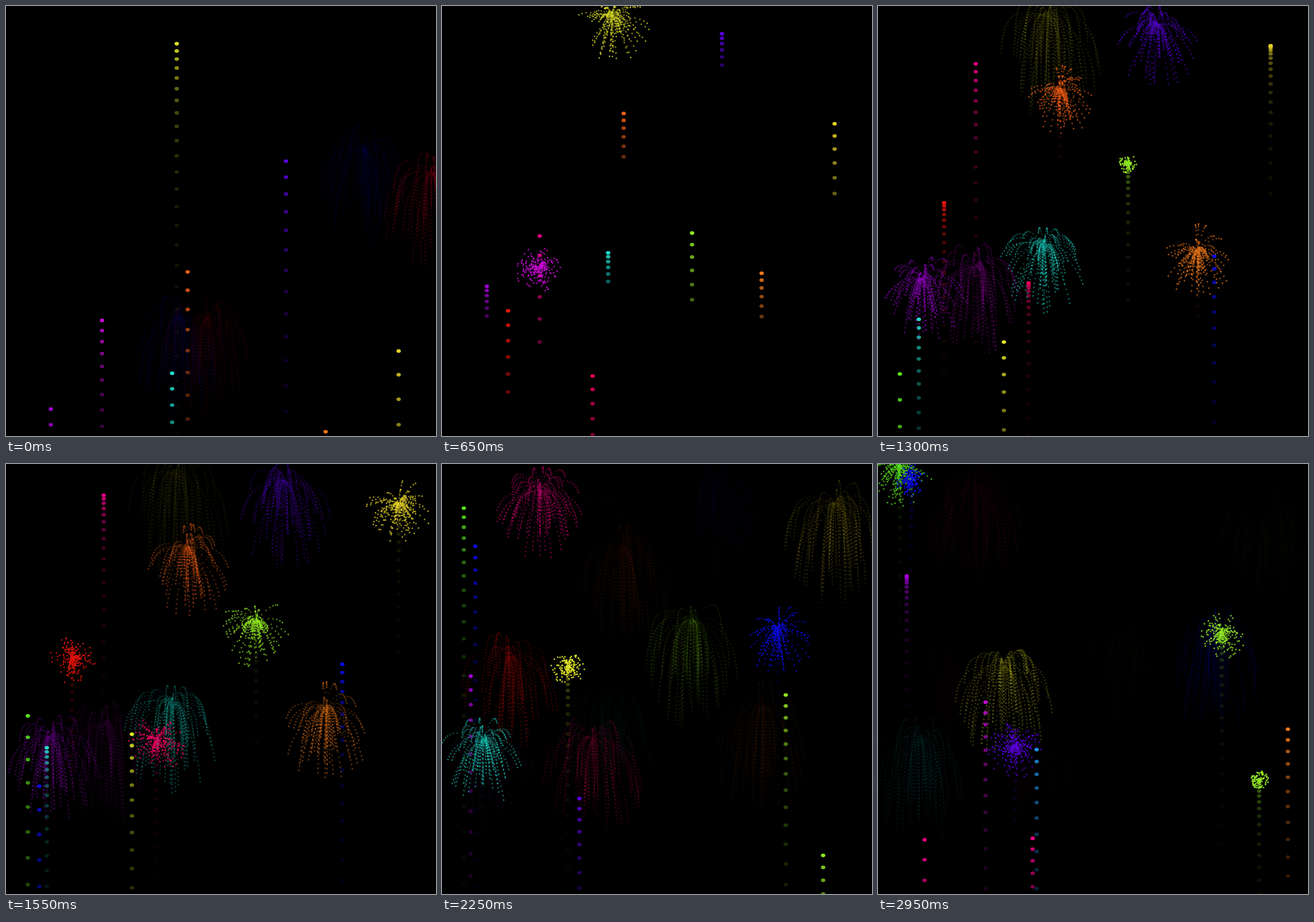
An HTML page with a canvas that plays this animation: 748x748 px, repeating every 3000 ms.

```html
<!DOCTYPE html>
<html lang="en">
<head>
<meta charset="utf-8">
<title>Fireworks</title>
<style>
  html, body { margin: 0; width: 100%; height: 100%; overflow: hidden; background: #000; }
  canvas { display: block; width: 748px; height: 748px; }
</style>
</head>
<body>
<canvas id="stage" width="748" height="748"></canvas>
<script>
const ctx = document.getElementById('stage').getContext('2d');
const SIZE = 748, STEP = 50, STEPS = 60, WIPE = 8;
const TRAIL = 24, KEEP = 0.85;
const GRAVITY = 1.536, SINK = 1.15, DRAG = 0.82, SPEED = 20, SPARKS = 85, LIFE = 21;

const COLORS = {
  yellow: '225,228,40', gold: '228,208,40', orange: '235,92,22', amber: '235,118,25',
  red: '228,20,12', crimson: '225,0,45', rose: '228,0,95', pink: '232,0,130',
  magenta: '198,10,212', purple: '160,0,212', violet: '92,0,225', blue: '12,12,228',
  sky: '30,140,225', cyan: '30,222,205', green: '90,228,30', lime: '145,230,35'
};

// x, height of the apex, step at which it is reached, colour
const rockets = [
  [740, 290, -17, 'crimson'], [622, 250, -21, 'blue'],
  [350, 545, -22, 'crimson'], [300, 540, -21.5, 'blue'],
  [297, 20, 7.7, 'yellow'], [487, 32, 17.6, 'violet'], [316, 146, 20.3, 'orange'],
  [683, 69, 26.3, 'gold'], [167, 454, 11, 'magenta'], [78, 474, 17.2, 'purple'],
  [289, 417, 17, 'cyan'], [556, 424, 20.3, 'amber'], [170, 45, 34.5, 'pink'],
  [435, 273, 25.6, 'lime'], [115, 336, 28.9, 'red'], [262, 480, 27.6, 'rose'],
  [71, 480, 35.2, 'cyan'], [219, 352, 43.4, 'yellow'], [585, 289, 39.8, 'blue'],
  [38, 3, 54.8, 'green'], [58, 25, 57.4, 'blue'], [50, 194, 60.1, 'purple'],
  [598, 293, 56.9, 'lime'], [239, 489, 56, 'violet'], [663, 549, 58.1, 'lime'],
  [187, 311, 70.6, 'magenta'], [276, 367, 72, 'sky'], [713, 358, 70.6, 'amber'],
  [81, 282, 81, 'pink'], [269, 546, 70.7, 'pink']
].map(([x, top, apex, color], i) => ({
  x, top, apex, rgb: COLORS[color], sparks: makeSparks(i + 1)
}));

function makeSparks(seed) {
  let s = seed * 7919;
  const random = () => (s = (s * 16807) % 2147483647) / 2147483647;
  for (let i = 0; i < 5; i++) random();
  return Array.from({ length: SPARKS }, () => {
    const angle = random() * Math.PI * 2, speed = SPEED * (0.1 + 0.9 * random());
    return [Math.cos(angle) * speed, Math.sin(angle) * speed];
  });
}

function drawRocket(r, step) {
  const y = r.top + GRAVITY / 2 * (r.apex - step) ** 2;
  if (y > SIZE + 5) return;
  ctx.beginPath();
  ctx.ellipse(r.x, y, 3.8, 3.1, 0, 0, Math.PI * 2);
  ctx.fill();
}

function drawBurst(r, age) {
  // Closed sums of a velocity that is damped and pulled down at each step
  const reach = DRAG * (1 - DRAG ** age) / (1 - DRAG);
  const fall = SINK / (1 - DRAG) * (age - reach);
  for (const [vx, vy] of r.sparks) {
    ctx.fillRect(r.x + vx * reach - 1.25, r.top + vy * reach + fall - 1.25, 2.5, 2.5);
  }
}

function drawStep(step, glow) {
  for (const r of rockets) {
    const age = step - Math.ceil(r.apex) + 1;
    if (age >= LIFE) continue;
    ctx.fillStyle = `rgb(${r.rgb})`;
    ctx.globalAlpha = age < 1 ? glow : glow * (1 - age / LIFE);
    if (age < 1) drawRocket(r, step);
    else drawBurst(r, age);
  }
}

// Redraws the recent steps, oldest and faintest first
function draw(now) {
  ctx.clearRect(0, 0, SIZE, SIZE);
  const first = now < WIPE ? now - TRAIL : Math.max(WIPE, now - TRAIL);
  for (let step = first; step <= now; step++) drawStep(step, KEEP ** (now - step));
}

let shown = -1;
const start = performance.now();

function render() {
  const step = Math.floor((performance.now() - start) / STEP) % STEPS;
  if (step !== shown) draw(shown = step);
  requestAnimationFrame(render);
}
render();
</script>
</body>
</html>
```
